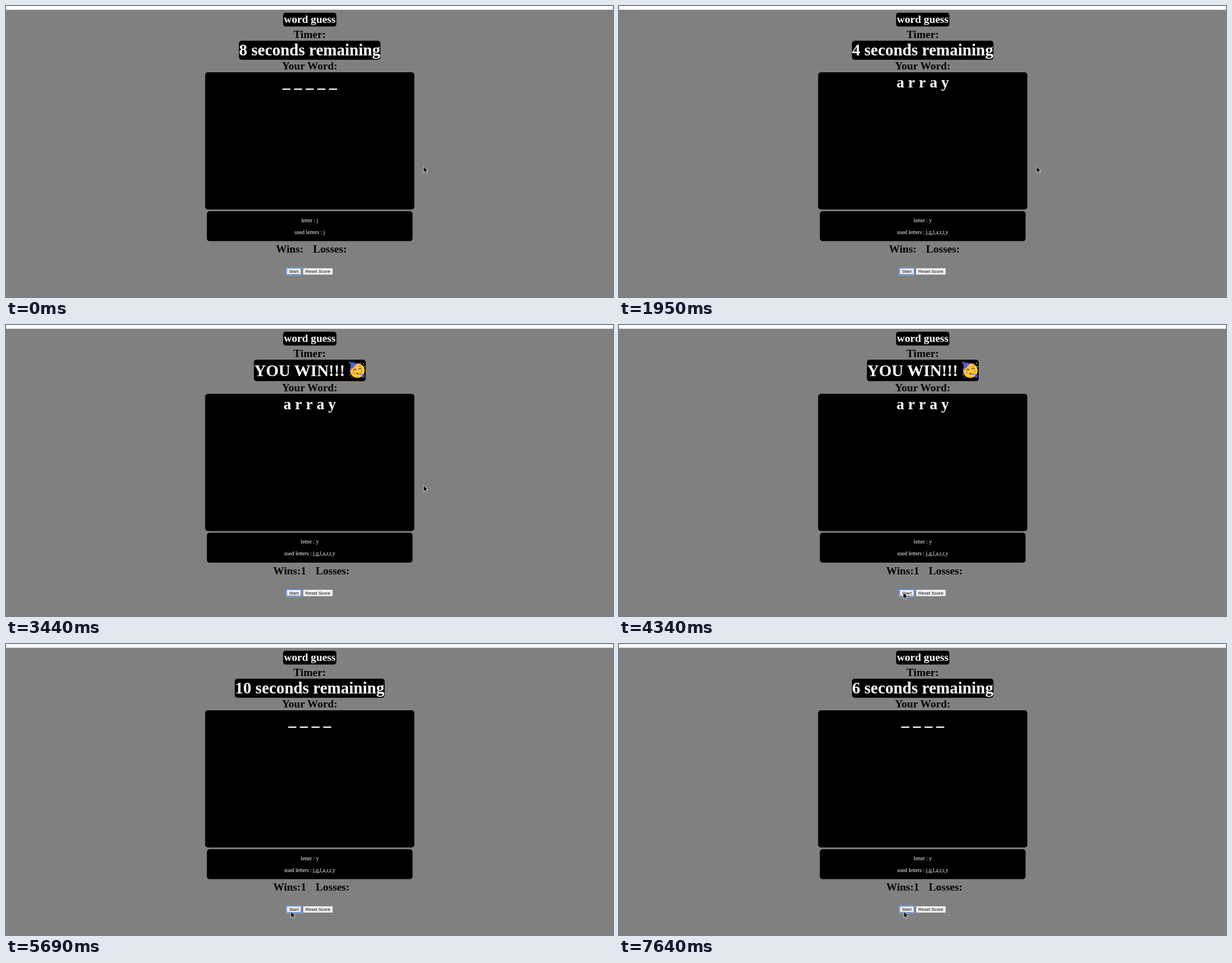
Write an HTML page that moves like this. It is 1080 px wide and 518 px high and loops after 8000 ms.

```html
<!DOCTYPE html>
<html lang="en">
<head>
<meta charset="utf-8">
<title>word guess</title>
<style>
  html, body { margin: 0; width: 100%; height: 100%; overflow: hidden; background: #808080; }
  svg { display: block; width: 1080px; height: 518px; }
  text { font-family: "Liberation Serif", "Times New Roman", serif; white-space: pre; }
  .mid { text-anchor: middle; }
  .head { font-size: 19.35px; font-weight: bold; }
  .big { font-size: 29.05px; font-weight: bold; fill: #fff; }
  .slot { font-size: 27.6px; font-weight: bold; fill: #fff; text-anchor: middle; }
  .small { font-size: 9.67px; fill: #fff; text-anchor: middle; }
  .btn { font: 8.06px "Liberation Sans", Arial, sans-serif; text-anchor: middle; }
</style>
</head>
<body>
<svg viewBox="0 0 1080 518">
  <rect width="1080" height="518" fill="#808080"/>
  <rect width="1080" height="6.7" fill="#fcfcfd"/>
  <rect x="493" y="12" width="94.8" height="24.5" rx="4.5"/>
  <text class="head mid" x="540.4" y="30.3" fill="#fff">word guess</text>
  <text class="head mid" x="540.4" y="57">Timer:</text>

  <rect id="timerBox" y="61.8" rx="4.8"/>
  <text id="timer" class="big mid" x="540.4" y="88.2"></text>
  <g id="win">
    <text class="big" x="441.5" y="91">YOU WIN!!!</text>
    <g id="face" stroke-linecap="round" fill="none">
      <circle cx="625.2" cy="81.2" r="12.9" fill="#fdca35"/>
      <path d="M614 88a12.9 12.9 0 0 0 22 0.2a14 11 0 0 1-22-0.2z" fill="#f4a52a"/>
      <path d="M611.2 66l13.6 2.6q-6.200 3.300-10.800 10.400z" fill="#4b3fa8"/>
      <path d="M613.500 69.500l4.500-2.200M613.600 74l7.400-6" stroke="#35a3e8" stroke-width="1.300"/>
      <path d="M613.800 79.200q4.200-7 11-10.600" stroke="#9a55d3" stroke-width="2"/>
      <circle cx="611.800" cy="66.400" r="1.500" fill="#7a5be0"/>
      <path d="M618.200 80.500q2-3.600 4.600-.8M627.600 78.600q2.500-3.300 4.700-.2" stroke="#5a3510" stroke-width="1.400"/>
      <path d="M617.600 76.200q1.500-2 3.800-2M628 73.600q2-.9 3.800.5" stroke="#8a5a1c" stroke-width=".9"/>
      <circle cx="618.800" cy="84.800" r="2" fill="#f58b3c"/>
      <circle cx="633" cy="82.500" r="1.900" fill="#f58b3c"/>
      <path d="M625 86.400l10.500 2.200q2.800 1.200 1.600 3.200t-3.200.2" stroke="#4656c9" stroke-width="2.500"/>
      <path d="M627.600 87l1.200.3M632 88l1.200.2" stroke="#8fd0f5" stroke-width="2"/>
      <circle cx="625.200" cy="86.600" r="1.700" fill="#8a3f17"/>
      <circle cx="631" cy="68" r="1.100" fill="#e8483f"/>
      <circle cx="637.600" cy="74" r="1.200" fill="#3fa9f5"/>
      <circle cx="612.300" cy="88.500" r="1.200" fill="#e8483f"/>
      <circle cx="615.500" cy="93.200" r="1" fill="#3fa9f5"/>
      <circle cx="636" cy="68.400" r="1" fill="#f7d34a"/>
    </g>
  </g>

  <g id="lower">
    <text class="head mid" x="540.4" y="113">Your Word:</text>
    <rect x="354.3" y="118" width="372.2" height="244.3" rx="5"/>
    <g id="word"></g>
    <rect x="357.4" y="365.3" width="366" height="53.3" rx="5"/>
    <text id="letter" class="small" x="540.4" y="384.8"></text>
    <text id="used" class="small" x="540.4" y="405.7"></text>
    <text id="wins" class="head" y="439.3"></text>
    <text id="losses" class="head" y="439.3">Losses:</text>
    <rect x="498.2" y="465.4" width="27.800" height="13.800" rx="1.800" fill="#fff"/>
    <rect id="start" x="499.2" y="466.4" width="25.800" height="11.800" rx="1.200" stroke="#1c66d6" stroke-width="1.200"/>
    <text class="btn" x="512" y="475">Start</text>
    <rect x="528.300" y="466.400" width="53.300" height="12.200" rx="1.200" fill="#efefef" stroke="#6f6f6f" stroke-width=".6"/>
    <text class="btn" x="554.800" y="475">Reset Score</text>
  </g>
  <path id="cursor" d="M0 0V11.400L2.600 9L4.400 13L6.300 12.200L4.600 8.300H8z" fill="#000" stroke="#fff" stroke-width=".8" stroke-linejoin="round"/>
</svg>
<script>
const LOOP = 8000;
const MID = 540.4;
const steps = [
  [0, { time: 8, win: false, word: '_____', used: 'j', wins: '', down: false, at: [742.7, 285.2] }],
  [150, { time: 7 }],
  [300, { used: 'jg' }],
  [450, { used: 'jgl' }],
  [600, { used: 'jgla', word: 'a__a_' }],
  [750, { time: 6 }],
  [1200, { time: 5 }],
  [1500, { used: 'jglar', word: 'arra_' }],
  [1650, { time: 4 }],
  [1800, { used: 'jglarr' }],
  [1950, { used: 'jglarry', word: 'array' }],
  [2240, { win: true, wins: '1' }],
  [3740, { at: [704, 330] }],
  [3890, { at: [612, 412] }],
  [4040, { at: [534, 462] }],
  [4190, { at: [495, 476] }],
  [4340, { at: [505.8, 476] }],
  [4640, { at: [506.8, 476] }],
  [4940, { down: true }],
  [5090, { down: false, word: '____' }],
  [5690, { win: false, time: 10 }],
  [6140, { time: 9 }],
  [6590, { time: 8 }],
  [7190, { time: 7 }],
  [7640, { time: 6 }]
];

const $ = id => document.getElementById(id);
const set = (el, attrs) => { for (const k in attrs) el.setAttribute(k, attrs[k]); return el; };
const make = (tag, attrs) => set(document.createElementNS('http://www.w3.org/2000/svg', tag), attrs);

function drawWord(word) {
  const size = 27.6, gap = size * 0.25;
  const advance = c => size * (c === 'r' ? 0.444 : 0.5);
  let x = MID + gap / 2;
  for (const c of word) x -= (advance(c) + gap) / 2;
  $('word').replaceChildren(...[...word].map(c => {
    const w = advance(c), left = x;
    x += w + gap;
    if (c === '_') return make('rect', { x: left - 0.3, y: 146.9, width: w + 0.6, height: 2.3, fill: '#fff' });
    const glyph = make('text', { class: 'slot', x: left + w / 2, y: 145 });
    glyph.textContent = c;
    return glyph;
  }));
}

function draw(s) {
  const [x, width] = s.win ? [441, 199] : s.time > 9 ? [407, 266.7] : [414.5, 251.7];
  set($('timerBox'), { x, width, height: s.win ? 38.3 : 33.9 });
  $('timer').textContent = s.win ? '' : s.time + ' seconds remaining';
  set($('win'), { visibility: s.win ? 'visible' : 'hidden' });
  set($('lower'), { transform: `translate(0 ${s.win ? 4.5 : 0})` });
  drawWord(s.word);
  $('letter').textContent = 'letter : ' + s.used.slice(-1);
  $('used').textContent = 'used letters : ' + [...s.used].join(',');
  $('wins').textContent = 'Wins:' + s.wins;
  set($('wins'), { x: s.wins ? 475.4 : 480.2 });
  set($('losses'), { x: s.wins ? 551.1 : 546.3 });
  set($('start'), { fill: s.down ? '#dcdcdc' : '#efefef' });
  set($('cursor'), { transform: `translate(${s.at})` });
}

let shown = -1;
function frame() {
  const t = performance.now() % LOOP;
  const past = steps.filter(([at]) => at <= t);
  if (past.length !== shown) {
    shown = past.length;
    draw(Object.assign({}, ...past.map(p => p[1])));
  }
  requestAnimationFrame(frame);
}
frame();
</script>
</body>
</html>
```
